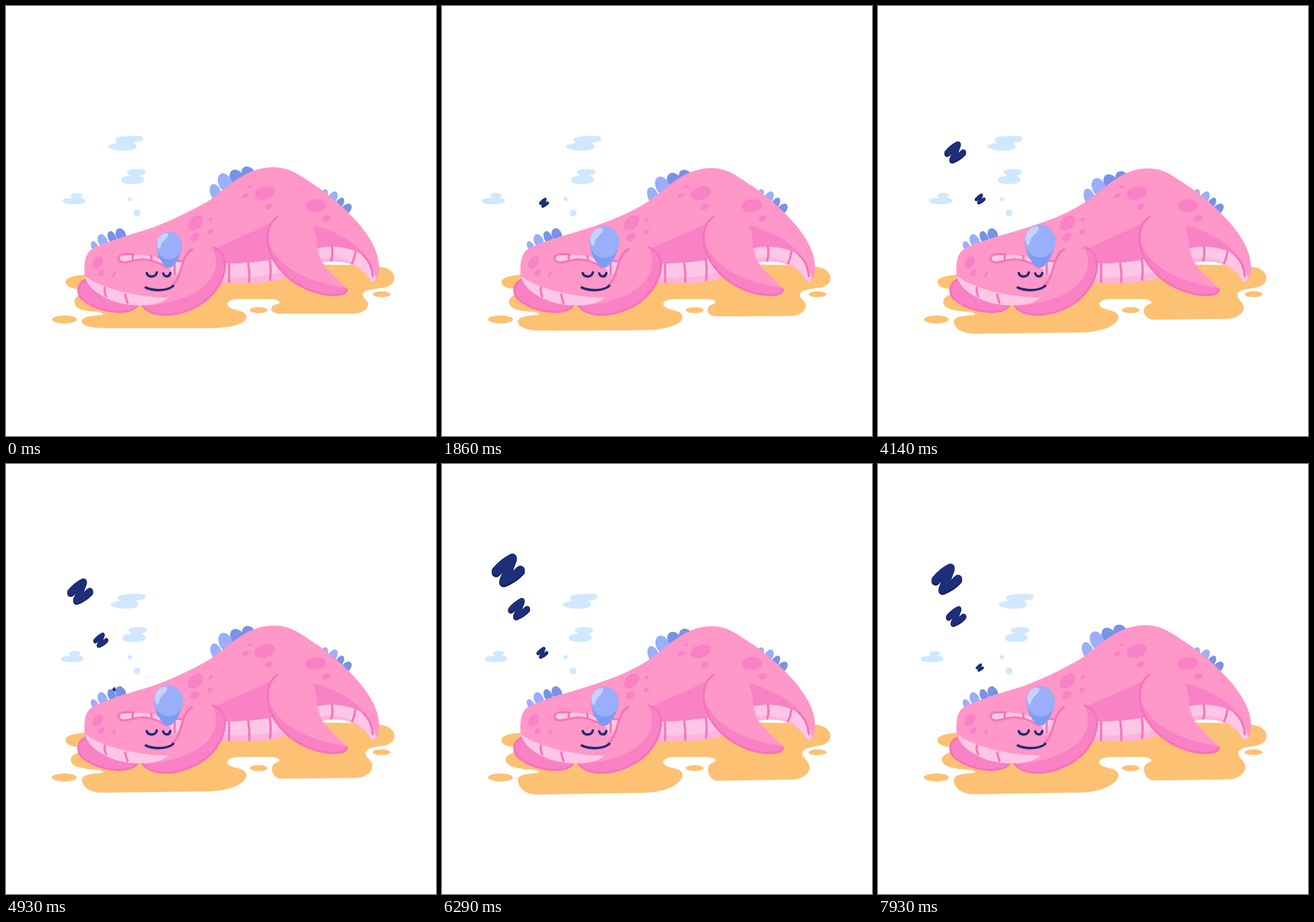
Animation of 640x640 px, one loop 8000 ms. Source, as an HTML page:

```html
<!DOCTYPE html>
<html lang="en">
<head>
<meta charset="utf-8">
<title>Sleeping dinosaur</title>
<style>
  html, body { margin: 0; width: 100%; height: 100%; overflow: hidden; background: #fff; }
  svg { display: block; width: 100vw; height: 100vh; }
  .skin { fill: #ff97c8; }
  .shade { fill: #f981c5; }
  .belly { fill: #ffc7e5; }
  .fold { fill: #fcb5de; }
  .light { fill: #9aaefa; }
  .dark { fill: #7892e6; }
  .sand { fill: #fdc173; }
  .cloud { fill: #d0e8ff; }
  .line, .face, .z path { fill: none; stroke-linecap: round; stroke-linejoin: round; }
  .line { stroke: #f773ba; stroke-width: 3.2; }
  .face { stroke: #1d2c72; stroke-width: 3.6; }
  .z path { stroke: #1c2f78; stroke-width: 9; }
  .z path:first-child { stroke: #0d1a55; }
</style>
</head>
<body>
<svg viewBox="0 0 640 640">
  <g class="cloud">
    <path class="drift" d="M168 195C176 193 190 193 198 193.3C206 194 206 201 199 202C194 203 188 203 191 205C197 208 195 214 183 215C170 216 155 214 152 210C151 206 159 206 166 203C162 201 161 197 168 195Z"/>
    <path class="drift" d="M184 244C189 242.500 198 242.500 204 243.500C210 245 208 251 202 251.500C196 252 201 253 204 255C208 259 204 264 196 264.500C187 265.500 174 265 171.500 261C170 256 176 253 182 253C187 252 183 251 181 249C179 247 180 245 184 244Z"/>
    <path class="drift" d="M98 280C101 277.500 111 278 113.500 280.500C115 283 110 284 110 285C116 286 119 289 118 291.500C116 295.500 94 296 87 293.500C83 291 83 288 88 286.500C94 286 101 286 98 284C96 283 96 281 98 280Z"/>
    <circle cx="184" cy="287.500" r="3"/><circle cx="195" cy="308" r="5.200"/>
  </g>
  <g class="sand">
    <path id="puddle"/>
    <ellipse cx="87" cy="466.500" rx="18.500" ry="6"/>
    <ellipse cx="376" cy="452.600" rx="13.300" ry="4.400"/>
    <ellipse cx="559" cy="429" rx="13.300" ry="4.300"/>
  </g>
  <g id="snores"></g>
  <g id="headSpikes"></g>
  <g id="backSpikes"></g>
  <g id="tailSpikes"></g>

  <path class="shade" d="M122 405C104 412 103 430 118 440C140 456 185 462 195 447L150 415Z"/>
  <path class="line" d="M119 407C104 414 104 431 118 440C140 456 185 462 195 446"/>
  <path id="body" class="skin"/>

  <path class="shade" d="M313 360L393 324L425 376C390 383 350 384 320 384Z"/>
  <path class="belly" d="M318 383C350 384 390 380 410 374L425 400C400 414 360 413 318 411Z"/>
  <path class="fold" d="M320 403C355 405 385 404 408 396L422 402C400 414 360 413 318 411Z"/>
  <path class="line" d="M332 384V411M360.500 383Q363 397 362 411M392.500 377Q395 393 393 408"/>

  <path class="shade" d="M456 326C500 338 544 362 548 405L541 400L527 370C505 357 480 356 463 361C463 350 460 335 456 326Z"/>
  <path class="belly" d="M463 361C480 356 505 358 523 366C539 376 547 393 551 406C549 412 543 413 540 405C530 385 500 376 470 382Z"/>
  <path class="fold" d="M466 376C495 370 525 378 542 409C526 383 500 376 470 382Z"/>
  <path class="line" d="M485 359Q487 370 484 379M520 366Q519 375 515 383M532 371C542 380 545 391 546 402"/>

  <path class="skin" d="M456 326C466 345 458 365 475 388C490 405 505 415 508 423C508 433 480 433 455 424C415 410 389 375 389 345C389 330 395 320 404 314L430 295Z"/>
  <path class="shade" d="M389 345C398 385 445 411 508 420C512 433 480 433 455 424C415 410 389 375 389 345Z"/>
  <path class="line" d="M404 314C395 320 389.500 330 389.500 345C389 375 415 410 455 424C480 433 508 432 507 422"/>

  <path class="skin" d="M308 359C330 367 333 395 312 424C290 455 225 475 203 446L245 400L280 362Z"/>
  <path class="shade" d="M308 359C330 367 333 395 312 424C290 455 225 475 203 446C270 444 330 412 308 359Z"/>
  <path class="line" d="M308 359.500C330 367 332 395 312 423C290 455 225 474 203 446"/>

  <path class="belly" d="M190 370C215 370 240 378 263 380L259 395L250 404L245 392C235 385 220 381 207 377C195 376 185 381 175 381C166 380 165 371 175 369Z"/>
  <path class="line" d="M188 369.500H176C165 370 165 381 175 381.500C184 382 192 377 204 377C218 378 230 383 239 389M190 370Q187 373 189 377M216 372L217 378M226 374Q244 379 262 380M251 382V400M248 415C263 404 259 372 277 362"/>
  <path class="belly" d="M118 402C135 417 190 434 242 434C227 448 190 448 165 441C140 433 120 418 118 402Z"/>
  <path class="line" d="M147 419Q146 425 149 432M177.500 429Q178 436 181 442"/>
  <g id="spots" class="shade"></g>
  <path class="face" d="M209.500 397.500C211 404.500 223 404.500 224.500 396.500M234 398C236 404 243 404 244.500 397.500M208 419C221 425 241 424 249 416.500"/>

  <g id="bubble">
    <path fill="#7c9cf3" d="M243 337C255 337 262 347 262 357C261 370 251 390 242 390C234 389 224 370 224 357C224 345 232 337 243 337Z"/>
    <ellipse class="light" cx="243" cy="356.500" rx="19" ry="20.500"/>
    <path fill="#c4d2fd" d="M239 338C229 338 222 350 226 359C227 363 230 362 231 356C233 348 243 346 241 339Q241 338 239 338Z"/>
  </g>
</svg>
<script>
const LOOP = 8000;
const $ = id => document.getElementById(id);
const drifting = document.querySelectorAll('.drift');
const driftReach = [42, 26.5, -31.6];

const puddleSmall = 'M118 400C100 401 88 405 88.5 411C89 419 102 422 112 421C116 430 102 430 102 440C102 450 112 454 135 455C142 456 149 459 140 460C125 461 113 463 113 470C113 476 127 479.5 150 479.5L300 479.5C335 479.5 358 473 358 463C358 455 346 453 338 451C328 448 326 441 335 438C340 436 345 436 355 436L390 436C400 436 407 438 407 441C407 444 402 444 399 445C393 448 391 458 410 458L515 458C530 458 539 451 539 444C539 438 531 435 531 430C531 420 560 421 567 418C575 415 578 411 578 404C578 395 567 388 553 388L540 386L250 380Z';
const puddleLarge = 'M118 400C100 401 88 405 88.5 411C89 419 102 422 112 421C114 430 94 430 94 440C94 450 112 454 135 455C142 456 149 459 140 460C125 461 113 463 113 470C113 481 122 493.3 141 493.3L300 490.5C335 490 358 475 358 463C358 455 346 453 338 451C328 448 326 441 335 438C340 436 345 436 355 436L390 436C400 436 407 438 407 441C407 444 402 444 399 447C393 452 396 473 412 473L520 471C538 471 548 461 548 452C548 442 537 439 537 431C537 420 560 421 567 418C575 415 578 411 578 404C578 395 567 388 553 388L540 386L250 380Z';

const underside = 'C556 400 552 411 546 411C541 411 540 405 537 399C525 380 490 378 462 382L420 402C390 414 350 412 328 411L242 434C190 434 135 420 117 403Z';
const bodyIn = 'M117 403C116 385 116 366 133 359C160 347 190 339 215 331C245 320 275 305 300 291C328 272 355 240 397 240C427 240 440 255 465 270C505 299 553 345 555 385' + underside;
const bodyOut = 'M117 403C116 385 116 366 133 359C160 347 190 340 215 332C250 322 285 309 308 293C340 272 362 242 403 242C429 242 440 255 465 270C505 299 553 345 555 385' + underside;

// age in seconds, x, y
const snorePath = [[0, 176, 378], [.76, 163, 342], [1.5, 151.5, 304], [2.05, 152, 287], [2.84, 141, 262],
  [3.54, 118, 239], [4.14, 115, 218], [4.76, 112, 193], [5.64, 104, 177], [6.86, 94, 142], [7.3, 91, 129]];
const snoreStarts = [0, 2.1, 4.05, 6.4];

const ellipses = (id, rows) => {
  $(id).innerHTML = rows.map(([x, y, rx, ry, turn, tone = '']) =>
    `<ellipse class="${tone}" rx="${rx}" ry="${ry}" transform="translate(${x} ${y}) rotate(${turn})"/>`).join('');
};
ellipses('headSpikes', [
  [132, 358, 5, 8.5, -28, 'light'], [144, 350, 7, 11, -24, 'light'],
  [158, 345, 6, 10.5, -24, 'dark'], [171, 341, 7.5, 10.5, -22, 'dark']]);
ellipses('backSpikes', [
  [361, 250, 9.5, 12, -38, 'dark'], [344, 256, 10, 13.5, -35, 'dark'],
  [326, 263, 10, 14.5, -24, 'light'], [312, 278, 8, 13.5, -20, 'light']]);
ellipses('tailSpikes', [
  [506, 303, 6.5, 10.5, 42, 'dark'], [496, 295, 5.5, 11, 32, 'dark'],
  [486, 286, 6.5, 11, 30, 'light'], [474, 280, 5, 7.5, 20, 'light']]);
ellipses('spots', [
  [385, 278.5, 15.5, 9.5, -18], [363, 268.7, 3.4, 2.2, -20], [356, 282.3, 5.2, 3.2, -25], [391, 298.5, 5.8, 4, -35],
  [461, 297, 15.3, 9.5, -5], [477, 316, 6.3, 4.3, -22], [282, 323, 13, 9, -42], [304.5, 317.7, 3.5, 2.3, -35],
  [304, 336, 4.5, 3, -48], [281, 344, 7.6, 5.3, -38], [136.500, 381.500, 10.3, 6.8, -57],
  [142, 397, 5.6, 3.6, -48], [161, 399, 4, 2.2, -55]]);

const zShape = 'M-12 1.5Q-5 -7 4 -11.500L-4.500 11.500Q5 8 12 .5';
$('snores').innerHTML = snoreStarts.map(() =>
  `<g class="z"><path d="${zShape}" transform="translate(0 .8)"/><path d="${zShape}" transform="translate(0 -.8)"/></g>`).join('');
const snores = [...$('snores').children];

const lerp = (a, b, k) => a + (b - a) * k;
const clamp = v => Math.min(1, Math.max(0, v));
// 0 -> 1 -> 0 over one period
const swing = (t, period) => 1 - Math.abs(1 - 2 * (t / period % 1));
const mixPath = (a, b, k) => {
  const ends = b.match(/-?[\d.]+/g);
  let i = 0;
  return a.replace(/-?[\d.]+/g, v => lerp(+v, +ends[i++], k).toFixed(2));
};
const along = (path, age) => {
  const i = Math.max(1, path.findIndex(p => p[0] >= age));
  const [a, b] = [path[i - 1], path[i]];
  const k = (age - a[0]) / (b[0] - a[0]);
  return [lerp(a[1], b[1], k), lerp(a[2], b[2], k)];
};

function draw(t) {
  const drift = swing(t, 4740), breath = swing(t, 2640), blow = swing(t, 2865);
  drifting.forEach((c, i) => c.setAttribute('transform', `translate(${driftReach[i] * drift} 0)`));
  $('puddle').setAttribute('d', mixPath(puddleSmall, puddleLarge, swing(t, 14000)));
  $('body').setAttribute('d', mixPath(bodyIn, bodyOut, breath));
  $('backSpikes').setAttribute('transform', `translate(${3.2 * breath} ${8 * breath})`);
  $('bubble').setAttribute('transform', `translate(252 390) scale(${1 + .222 * blow}) translate(-252 -390)`);
  snores.forEach((z, i) => {
    const age = t / 1000 - snoreStarts[i];
    const alive = age > 0 && age < 7.2;
    z.style.display = alive ? '' : 'none';
    if (!alive) return;
    const [x, y] = along(snorePath, age);
    z.setAttribute('transform', `translate(${x} ${y}) scale(${age * .238})`);
    z.style.opacity = clamp((7.2 - age) / .8);
  });
}

const start = performance.now();
function tick() {
  draw((performance.now() - start) % LOOP);
  requestAnimationFrame(tick);
}
tick();
</script>
</body>
</html>
```
